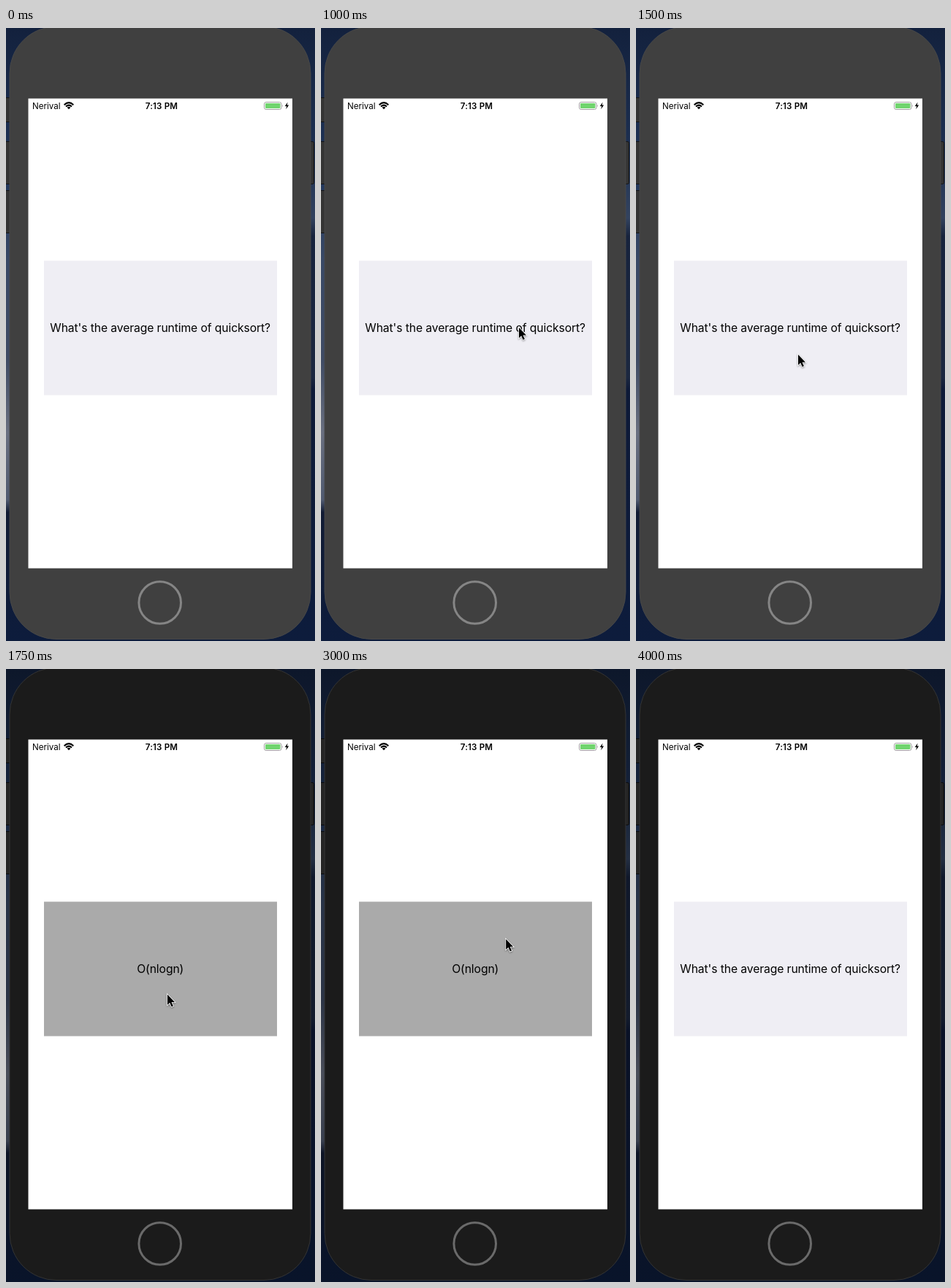
An HTML page for the animation above (4.5 s loop, 423 px wide and 839 px high).

```html
<!DOCTYPE html>
<html lang="en">
<head>
<meta charset="utf-8">
<title>Flash card</title>
<style>
  html, body { margin: 0; width: 100%; height: 100%; overflow: hidden; }
  svg { display: block; width: 423px; height: 839px; }
  text { font-family: Inter, "Noto Sans", sans-serif; }
  .status { font-size: 11.6px; }
  .time { font-weight: 600; letter-spacing: .15px; }
  .card { font-size: 15.7px; letter-spacing: -.1px; }
  .mid { text-anchor: middle; }
  .body { fill: #404040; stroke: #484848; }
  .button { fill: #343434; stroke: #141414; }
  .home { fill: none; stroke: #858585; stroke-width: 3; }
  .shade { opacity: 0; }
  .active .body { fill: #1b1b1b; stroke: #343434; }
  .active .button { fill: #242424; stroke: #0a0a0a; }
  .active .home { stroke: #6a6a6a; }
  .active .shade { opacity: .3; }
</style>
</head>
<body>
<svg id="stage" viewBox="0 0 423 839">
  <defs>
    <linearGradient id="left" x2="0" y2="1">
      <stop offset="0" stop-color="#13213d"/>
      <stop offset=".24" stop-color="#20355a"/>
      <stop offset=".38" stop-color="#394966"/>
      <stop offset=".54" stop-color="#3f4b64"/>
      <stop offset=".66" stop-color="#696f80"/>
      <stop offset=".77" stop-color="#505a70"/>
      <stop offset=".79" stop-color="#111b34"/>
      <stop offset="1" stop-color="#0d1c3c"/>
    </linearGradient>
    <linearGradient id="right" x2="0" y2="1">
      <stop offset="0" stop-color="#13213d"/>
      <stop offset=".2" stop-color="#1d3052"/>
      <stop offset=".31" stop-color="#33435f"/>
      <stop offset=".34" stop-color="#17233d"/>
      <stop offset=".57" stop-color="#1c2840"/>
      <stop offset=".59" stop-color="#0e1a38"/>
      <stop offset="1" stop-color="#0d1c3c"/>
    </linearGradient>
  </defs>

  <rect width="212" height="839" fill="url(#left)"/>
  <rect x="211" width="212" height="839" fill="url(#right)"/>
  <rect class="shade" width="423" height="839"/>

  <g class="button">
    <rect x="-2.5" y="95.5" width="10" height="33" rx="2"/>
    <rect x="-2.5" y="155.5" width="10" height="58" rx="2"/>
    <rect x="-2.5" y="222.5" width="10" height="58" rx="2"/>
    <rect x="412.5" y="155.5" width="9" height="58" rx="2"/>
  </g>
  <rect class="body" x="5" y="-2" width="412" height="838.5" rx="64"/>
  <circle class="home" cx="210.7" cy="786.5" r="28.8"/>
  <rect x="30.5" y="96.5" width="361.5" height="643" fill="#fff"/>

  <text class="status" x="36" y="110.5">Nerival</text>
  <g fill="none" stroke="#000" stroke-width="2">
    <path d="M79.7 105.2Q86 99 92.3 105.2M82 107.5Q86 103.7 90 107.5"/>
    <path d="M83.6 108.7Q86 106.7 88.4 108.7L86 111.2Z" fill="#000" stroke="none"/>
  </g>
  <text class="status time mid" x="213" y="110.5">7:13 PM</text>
  <rect x="353.5" y="101.5" width="23.5" height="10" rx="2.6" fill="#fff" stroke="#a0a0a0"/>
  <rect x="355" y="103" width="20.5" height="7" rx="1.2" fill="#70d46e"/>
  <path d="M378 104.8q1.6 1.7 0 3.4z" fill="#a0a0a0"/>
  <path d="M385.6 101.6L381.8 107H384.2L383.2 111.2L387.2 105.6H384.7Z"/>

  <rect id="card" x="52" y="318.5" width="319" height="184"/>
  <text id="label" class="card mid" x="211.2" y="416"></text>

  <path id="cursor" d="M0 0V14.2L3.2 11.3L5.6 16.8L7.9 15.8L5.5 10.4H10Z"
    stroke="#fff" stroke-width="1.6" paint-order="stroke"
    style="filter:drop-shadow(0 1px 1px #0006)"/>
</svg>
<script>
  const LOOP = 4500, STEP = 250;
  const FLIP = 1750, FLIP_BACK = 3500;
  const CURSOR_IN = 500, CURSOR_OUT = 4000;

  // Pointer tip at each step after it enters; the last place is held.
  const path = [
    [412, 258], [304, 387], [271, 410], [257.5, 421], [222, 447], [221, 445.5],
    [220.8, 437], [245, 202], [177.5, 407], [166.5, 382], [253.2, 369.8]
  ];
  const el = id => document.getElementById(id);
  const stage = el("stage"), card = el("card"), label = el("label"), cursor = el("cursor");

  function draw(t) {
    const flipped = t >= FLIP && t < FLIP_BACK;
    stage.classList.toggle("active", t >= FLIP);
    card.setAttribute("fill", flipped ? "#aaa" : "#efeef4");
    label.textContent = flipped ? "O(nlogn)" : "What's the average runtime of quicksort?";

    const shown = t >= CURSOR_IN && t < CURSOR_OUT;
    cursor.setAttribute("visibility", shown ? "visible" : "hidden");
    if (shown) {
      const i = Math.min(Math.floor((t - CURSOR_IN) / STEP), path.length - 1);
      cursor.setAttribute("transform", `translate(${path[i]})`);
    }
  }

  const start = performance.now();
  function tick() {
    draw((performance.now() - start) % LOOP);
    requestAnimationFrame(tick);
  }
  tick();
</script>
</body>
</html>
```
